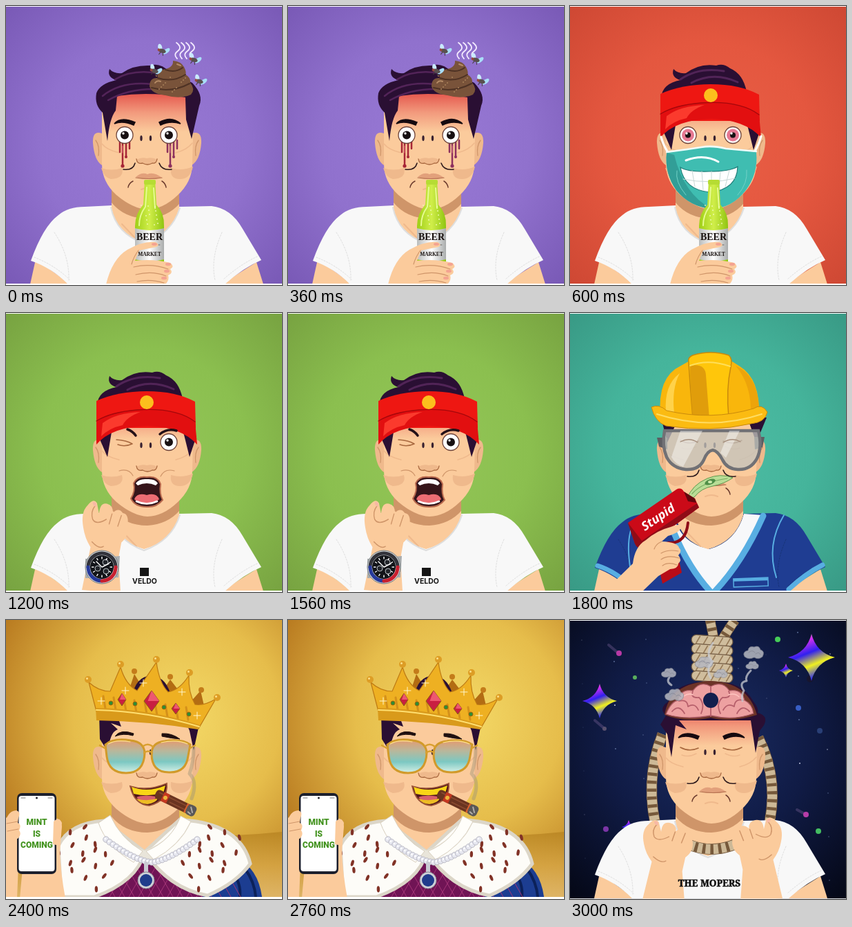
Animation, 400 px wide and 403 px high, one loop 3600 ms. Source, as an HTML page:

```html
<!DOCTYPE html>
<html lang="en">
<head>
<meta charset="utf-8">
<title>Portrait loop</title>
<style>
html,body{margin:0;width:100%;height:100%;overflow:hidden;background:#fff}
svg{position:absolute;left:0;top:0;width:400px;height:403px;display:block}
</style>
</head>
<body>
<svg id="stage" viewBox="0 0 400 403" xmlns="http://www.w3.org/2000/svg"></svg>
<script>
const SKIN = '#fbcb9c', SHADE = '#efb98c', DEEP = '#cf9569', LINE = '#a8683f', HAIR = '#2a0f33', GOLD = '#eeb022';

const p = (d, f, x = '') => `<path d="${d}" fill="${f}" ${x}/>`;
const l = (d, s, w = 1.5, x = '') =>
  `<path d="${d}" fill="none" stroke="${s}" stroke-width="${w}" stroke-linecap="round" stroke-linejoin="round" ${x}/>`;
const e = (x, y, rx, ry, f, m = '') => `<ellipse cx="${x}" cy="${y}" rx="${rx}" ry="${ry}" fill="${f}" ${m}/>`;
const c = (x, y, r, f, m) => e(x, y, r, r, f, m);
const r = (x, y, w, h, f, m = '') => `<rect x="${x}" y="${y}" width="${w}" height="${h}" fill="${f}" ${m}/>`;
const t = (x, y, s, size, f, font, m = '') =>
  `<text x="${x}" y="${y}" font-size="${size}" fill="${f}" font-family="${font}" text-anchor="middle" ${m}>${s}</text>`;
const g = (tr, s) => `<g transform="${tr}">${s}</g>`;
const many = (n, fn) => Array.from({ length: n }, (_, i) => fn(i)).join('');
const spots = (list, fn) => list.map(a => fn(...a)).join('');
const edge = (s, w = 1) => `stroke="${s}" stroke-width="${w}"`;

const stops = cs => cs.map((k, i) => `<stop offset="${i / (cs.length - 1)}" stop-color="${k}"/>`).join('');
const lin = (id, cs, x2 = 0, y2 = 1) => `<linearGradient id="${id}" x2="${x2}" y2="${y2}">${stops(cs)}</linearGradient>`;
const rad = (id, cs, cx = .5, cy = .5) => `<radialGradient id="${id}" cx="${cx}" cy="${cy}" r=".75">${stops(cs)}</radialGradient>`;

const defs = '<defs>' +
  rad('violet', ['#9879d5', '#9071cd', '#7656b3']) +
  rad('red', ['#e95f46', '#e4573f', '#cb4632']) +
  rad('green', ['#93c658', '#8bbf4f', '#759f3f']) +
  rad('teal', ['#4dbda4', '#45b49b', '#379682']) +
  rad('gold', ['#f4da68', '#e6bd4b', '#b4741c'], .62, .36) +
  rad('navy', ['#1b2d64', '#101b45', '#050817'], .5, .42) +
  lin('flush', ['#e5574d', '#f29a7d', '#fbcb9c']) +
  lin('floor', ['#b5811f', '#d9a948', '#ecca80']) +
  lin('lens', ['#e39a70', '#b9b79b', '#7cc8c2', '#d5efe6']) +
  lin('prism', ['#3cf040', '#d830f0', '#3020f0', '#f0f020', '#3030f0'], .4, 1) +
  lin('glass', ['#9fce16', '#d0ee4a', '#8fc410'], 1, 0) +
  lin('paper', ['#b9bcbc', '#ffffff', '#a9acac'], 1, 0) +
  '</defs>';

// ---- person ----
const neck = () =>
  p('M153 255V292Q160 330 200 341Q240 330 251 292V255Z', SKIN) +
  p('M153 258V284Q172 307 205 307Q234 305 251 286V258Z', DEEP) +
  l('M168 315L189 337', SHADE, 2);

const body = (cloth, seam) =>
  p('M35 402L43 366 94 402ZM373 402L363 370 312 402Z', SKIN) +
  p('M36 368Q54 318 76 302Q90 290 114 290L154 288Q202 350 250 290L298 289Q326 292 343 322L370 367Q344 378 317 402H90Q66 378 36 368Z', cloth) +
  l('M70 327Q92 360 91 396M313 327Q296 365 303 396', seam, 1, 'stroke-dasharray="2 2"') +
  l('M41 363Q70 374 92 395M364 362Q340 373 316 394', seam, 1, 'stroke-dasharray="2 2"') +
  neck() + l('M152 291Q160 329 200 343Q240 329 252 292', seam, 2);
const tee = () => body('#f8f8f8', '#dedede');

const nose = () =>
  e(196, 191, 1.7, 4, '#382130') + e(209.5, 191, 1.7, 4, '#382130') +
  p('M189 222Q196 218 204 220Q213 218 219 222Q218 229 212 227Q205 232 198 227Q191 229 189 222Z', SHADE) +
  l('M189 221Q190 229 198 227Q205 231 212 227Q218 228 219 221', LINE, 1.3);

const head = () =>
  p('M139 184Q125 179 126 198Q128 223 139 230ZM269 184Q284 179 283 198Q281 223 269 230Z', SHADE) +
  l('M130 194Q136 202 134 216M279 194Q273 202 275 216', DEEP, 1.3) +
  p('M139 150V228Q139 254 160 273Q184 293 205 294Q228 293 248 274Q270 254 270 228L272 150Q264 124 204 122Q145 124 139 150Z', SKIN) +
  p('M138 234Q153 239 168 234Q172 249 152 250Q142 248 138 234ZM239 234Q255 239 271 232Q267 250 252 250Q237 250 239 234Z', SHADE) +
  l('M139 199Q146 208 164 212M270 198Q262 208 246 212', SHADE) + nose();

const flush = () => p('M155 126H262L266 182H150Z', 'url(#flush)');
const sideburns = () => p('M134 178L147 208 153 172ZM276 178L266 208 257 172Z', HAIR);
const creases = () => l('M170 236Q184 238 187 227M240 236Q226 238 222 227', '#2d1a1c', 1.6);
const frown = () =>
  p('M188 247Q197 239 205 243Q214 239 226 248Q206 253 188 247Z', '#e2a07b') +
  l('M188 248Q207 251 226 248', '#b4704f', 1.2) + l('M177 262Q178 256 184 253M232 262Q231 256 226 253', '#6b3a2c', 1.5) + l('M196 265Q205 261 214 265', SHADE, 2);
const brows = () => p('M157 170Q166 159 187 168L185 172Q169 165 157 170ZM222 168Q240 158 253 170Q238 165 224 172Z', '#15090f', edge('#15090f', 1.5));
const shut = () =>
  l('M160 184Q173 191 186 185M222 185Q236 191 249 184', LINE, 1.6) +
  l('M162 195Q172 199 183 193M225 193Q237 199 246 195', SHADE);
const eye = (x, iris, pupil) =>
  c(x, 186.5, 12, '#fff', edge('#6b4138', 1.3)) + c(x, 186.5, iris, '#e57892') + c(x, 186.5, pupil, '#171012') + c(x - 2, 184, 1.7, '#fff');

const topHair = () =>
  p('M132 132Q134 112 160 107Q146 103 150 91Q156 98 168 97Q188 82 212 86Q222 82 232 90Q251 98 256 124Z', HAIR) +
  l('M160 106Q186 88 223 94M176 111Q208 94 243 110', '#512457', 3);

const visor = () => topHair() + sideburns() +
  p('M131 127Q162 113 204 113Q246 113 274 128L275 166H131Z', '#ee1712') +
  p('M131 157Q150 142 190 140Q245 136 274 157L277 190Q253 164 205 163Q153 164 131 190Z', '#e20f10') +
  p('M140 159Q160 144 195 143Q175 150 169 162Q150 166 138 178Z', '#fb3a2d') +
  l('M131 156Q152 143 190 140Q246 136 274 157', '#a5070b', 1.3) +
  c(204, 129, 10, '#fcbf1d');

// Clenched hand with forearm
const fist = () =>
  p('M0 116L12 61Q4 49 2 36Q-2 16 8 7Q16-3 21 4L24 18Q25 3 35 5Q44 7 43 17Q51 9 57 17Q65 18 64 30Q67 45 55 55L51 75 54 120Z', SKIN) +
  l('M18 8Q12 15 15 25Q20 33 34 25M42 18L38 31M55 20L50 34M14 54Q24 64 30 60', DEEP, 1.3) +
  p('M15 3Q21 1 20 9Q15 8 15 3Z', '#f7b8a5');

// ---- props ----
const bottle = () =>
  p('M201 252H216L218 287Q230 300 229 318V394Q208 401 187 394V318Q187 300 199 287Z', 'url(#glass)') +
  r(200, 251, 17, 7, '#b6dc33', 'rx="2"') +
  l('M204 262L202 290Q193 302 193 317M214 263L216 292', '#e7fb93', 2) +
  many(13, i => c(196 + i * 37 % 25, 288 + i * 13 % 32, .9, '#effbb4')) +
  p('M187 321Q208 327 229 321V366Q208 371 187 366Z', 'url(#paper)') +
  t(208, 338, 'BEER', 14, '#17100e', 'Liberation Serif, serif', 'font-weight="700"') +
  l('M193 345H202M213 345H223', '#6a6767', 1) +
  t(208, 361, 'MARKET', 7.5, '#17100e', 'Liberation Serif, serif', 'font-weight="700"');

const grip = () =>
  p('M145 402Q154 365 176 352Q199 339 217 341Q224 345 218 348L193 353 187 368Q214 365 238 371Q245 376 238 380Q243 386 235 389Q237 395 232 401V403H145Z', SKIN) +
  l('M192 353Q185 362 182 373M185 377Q210 371 235 380M188 388Q212 382 232 390M190 398Q210 394 229 400', DEEP, 1.2) +
  spots([[235, 373], [233, 383], [229, 393]], (x, y) => e(x, y, 4, 2.2, '#f4a391')) + e(215, 344, 4, 2, '#f4a391');

const fly = (x, y) => g(`translate(${x} ${y}) rotate(18)`,
  e(-3, -4, 3, 5, '#c9eaff', 'transform="rotate(-30)"') + e(5, -3, 3, 6, '#a9def8', 'transform="rotate(35)"') +
  e(0, 2, 5.5, 3, '#59504f') + c(-5, 2, 2, '#96483d') + l('M-2 5L-3 8M2 5L3 8', '#443c3b', 1));

const pile = () =>
  many(4, i => l(`M${248 + i * 7} 76Q${242 + i * 7} 70 ${249 + i * 7} 65T${247 + i * 7} 53`, '#f3eaff', 1.8)) +
  p('M208 116Q208 103 220 104Q217 93 231 91Q243 88 242 79Q254 80 258 88Q262 96 260 99Q268 103 267 111Q275 120 268 128Q252 135 231 129Q211 127 208 116Z', '#79533a') +
  l('M220 104Q242 111 260 99M211 118Q240 126 266 112M231 92Q246 97 256 89', '#4e3224', 2) +
  many(12, i => c(218 + i * 29 % 45, 101 + i * 17 % 24, 1, '#a9805a')) + l('M216 111Q219 107 224 109M248 84L253 86', '#b58b66', 2) +
  fly(227, 63) + fly(216, 92) + fly(273, 76) + fly(281, 107);

const blood = (x, k) =>
  l(`M${x - 7} 195V211M${x - 3} 196V229M${x + 2} 196V217M${x + 7} 194V206`, k, 2.5) +
  c(x - 3, 231, 2.6, k) + c(x + 2, 218, 2, k) + l(`M${x - 3} 202V212`, '#ef8591', .8);

const mask = () =>
  l('M132 189Q137 207 147 218M277 188Q272 207 262 217', '#fff', 3) +
  p('M140 212Q172 207 190 204Q206 201 226 206L270 211Q273 242 255 266Q235 292 205 293Q174 290 154 266Q137 242 140 212Z', '#3fbdb1') +
  p('M140 212Q137 242 154 266Q174 290 205 293Q165 272 151 215Z', '#329e97') +
  l('M140 211Q172 207 190 204Q206 201 226 206L270 210', '#effcfa', 2.5) +
  l('M168 223Q194 213 215 225', '#fff', 3) + l('M155 238Q152 254 168 273M256 237Q258 256 243 273', '#73d2c7', 1) +
  p('M160 233Q171 240 202 239Q232 239 243 232Q242 265 203 269Q166 266 160 233Z', '#fff', edge('#207e79', 1.2)) +
  l('M164 250Q202 258 239 249M177 238L181 261M191 239L193 266M205 239V267M218 239L216 265M231 237L225 261', '#c9d8d6', 1);

const watch = () =>
  p('M115 355L165 351 163 382 115 383Z', '#a9adaf') +
  l('M117 361H162M117 368H162M117 375H162M122 354V382M157 353V381', '#e9eded', 1.3) +
  c(139, 367, 24, '#d5d8d9', edge('#73797c')) +
  l('M119 367A20 20 0 0 1 159 367', '#32333b', 5) + l('M119 367A20 20 0 0 0 139 387', '#263a9c', 5) + l('M139 387A20 20 0 0 0 159 367', '#c8202f', 5) +
  c(139, 367, 17, '#121419') + spots([[133, 369], [144, 360], [145, 373]], (x, y) => c(x, y, 4, '#22252b', edge('#b8bec2'))) +
  many(12, i => r(138.3, 352, 1.4, 3.5, '#fff', `transform="rotate(${i * 30} 139 367)"`)) + l('M139 367L131 359M139 367L149 362', '#fff', 1.4);

const gasp = () =>
  p('M185 246Q190 235 204 237Q220 235 224 247Q222 261 227 270Q218 281 204 280Q187 280 181 268Q188 257 185 246Z', '#36151a', edge('#b9694d', 2)) +
  p('M188 246Q193 239 204 240Q216 239 220 246L217 249Q204 243 191 249Z', '#fff') +
  p('M186 269Q190 259 204 263Q218 259 222 269Q214 276 204 276Q193 276 186 269Z', '#ec6d73') +
  l('M189 272Q204 279 219 272', '#fff', 2.6) + l('M164 228Q178 224 184 235M244 228Q230 224 224 236', DEEP, 1.2);

const scrubs = () =>
  body('#1f3d92', '#183477') +
  p('M149 291Q160 333 202 341Q241 330 252 290L281 292Q250 360 210 402H200Q172 370 149 316Z', '#f7f8fa') + neck() +
  l('M151 318Q172 368 203 402M280 293Q250 360 210 402', '#58aee2', 9) +
  l('M40 365Q68 374 91 398M366 364Q342 376 317 399', '#58aee2', 7) +
  l('M104 292Q76 309 89 378M310 292Q284 335 299 382', '#58aee2', 2) +
  r(237, 383, 50, 12, '#1f3d92', 'transform="rotate(-2 262 388)" ' + edge('#58aee2', 1.5)) +
  r(237, 383, 50, 4, '#58aee2', 'transform="rotate(-2 262 388)"');

const helmet = () =>
  p('M131 150Q126 92 161 76Q205 48 246 77Q276 95 274 150Z', '#f9b60c') +
  p('M139 143Q136 104 159 87Q147 109 151 145Z', '#ffd24a') +
  p('M240 76Q276 92 274 150H262Q264 104 240 76Z', '#eda40a') +
  p('M178 152Q174 105 172 72Q170 64 178 61Q204 53 230 61Q236 66 233 78Q226 110 230 151Z', '#ffc60b', edge('#c98a0c', 1.5)) +
  p('M178 151Q174 105 174 76Q196 72 197 90L202 153Z', '#e09d0b') +
  l('M174 76Q200 66 232 77', '#ffdf59', 2) +
  p('M118 136Q129 131 140 141Q205 156 266 138Q278 130 286 143Q283 158 262 160Q205 173 139 163Q123 157 118 136Z', '#fbbb12', edge('#c98a0c', 1)) +
  l('M126 146Q203 171 278 146', '#ffdc62', 2);

const goggles = () =>
  p('M126 180H141V197L129 193ZM267 179H282L279 194 268 197Z', '#5d5d62') +
  p('M137 170H273Q279 194 271 210Q262 227 243 226Q227 225 221 212Q214 199 207 198Q199 199 194 212Q187 227 168 226Q148 224 140 208Q133 192 137 170Z', '#c3c4be', 'fill-opacity=".76" stroke="#717175" stroke-width="4.5"') +
  p('M160 170H192L164 222Q152 218 147 208ZM231 170H246L226 209 218 202Z', '#fff', 'opacity=".42"') +
  l('M160 186Q173 179 185 187M222 187Q235 179 247 186', '#a58e7c', 1.3);

const bill = () =>
  p('M169 269Q177 248 199 239Q218 231 236 238Q223 247 207 250Q190 253 180 266Z', '#b9dd96', edge('#5e984d', 1)) +
  l('M177 261Q192 244 228 239', '#78ad62', 1.2) + e(203, 244, 8, 3.8, '#4f8e47', 'transform="rotate(-20 203 244)"') + e(203, 244, 3, 2, '#c8e8a9');

const gun = () =>
  p('M124 345L153 335 162 375 134 391Z', '#b80c17') + l('M142 332Q168 334 171 303', '#8f0c17', 4) +
  p('M84 303L154 255Q161 251 165 258L181 268 187 281 110 337Q99 344 94 333Z', '#cb0a18') +
  p('M84 303L94 333Q99 344 110 337L187 281 184 275 104 329Z', '#8f0c17') + p('M165 258L181 268 183 274 171 272Z', '#63070e') +
  t(0, 0, 'Stupid', 18, '#fff', 'Open Sans, sans-serif', 'font-weight="700" font-style="italic" transform="translate(131 300) rotate(-34)"') +
  p('M50 402L91 362Q94 337 110 328Q126 314 146 309Q160 303 161 309Q160 317 142 322L133 330Q156 331 158 339Q163 344 157 350Q163 357 157 362Q157 369 145 370L128 380 105 402Z', SKIN) +
  l('M133 330Q124 334 122 341M157 344Q142 341 132 347M158 354Q142 349 132 356M155 364Q142 359 134 365', DEEP, 1.2);

const crown = () =>
  p('M176 108L186 78 203 106ZM226 104L238 86 255 108ZM266 120L282 102 288 128Z', '#b36c13') +
  spots([[186, 74], [238, 82], [283, 101]], (x, y) => c(x, y, 4, '#c47c1a')) +
  p('M183 110Q188 82 210 80Q234 82 240 114Z', HAIR) +
  p('M131 132L120 90Q134 103 151 103L166 68Q173 93 190 102L218 61Q222 91 235 104Q252 101 265 80Q264 105 274 122Q288 124 304 114L279 157Q205 134 131 132Z', GOLD, edge('#bd7913', 1.2)) +
  many(9, i => l(`M${141 + i * 15} ${110 + i * 2}L${144 + i * 15} ${128 + i * 2}`, '#d4901a', 3)) +
  p('M130 127Q207 128 282 152L278 158Q205 146 131 145Z', '#d99a1b') + l('M131 130Q207 132 280 154', '#ffdf70', 2) +
  spots([[119, 86], [166, 64], [218, 57], [266, 76], [306, 112]], (x, y) => c(x, y, 5, '#dd9d25') + c(x - 1.5, y - 1.5, 1.5, '#ffe08a')) +
  spots([[168, 115, 6, 9], [211, 117, 11, 15], [246, 128, 6, 8]], (x, y, w, h) =>
    p(`M${x} ${y - h}L${x + w} ${y} ${x} ${y + h} ${x - w} ${y}Z`, '#c91f42', edge('#8a5c12')) + p(`M${x} ${y - h}L${x + w} ${y} ${x - w / 2} ${y}Z`, '#ed5870')) +
  spots([[152, 120], [187, 121], [229, 126], [265, 136]], (x, y) => c(x, y, 3, '#2f8d35', edge('#9c6510'))) +
  spots([[138, 117], [173, 102], [199, 91], [255, 104], [277, 138]], (x, y) => l(`M${x - 5} ${y}H${x + 5}M${x} ${y - 5}V${y + 5}`, '#fff6ca', 1));

const shades = () =>
  p('M144 180Q155 170 181 174Q200 176 201 192Q200 221 174 221Q149 221 146 197Z', 'url(#lens)', edge('#d19a2a', 3)) +
  p('M267 180Q254 171 230 175Q211 177 211 193Q211 220 236 220Q261 221 264 196Z', 'url(#lens)', edge('#d19a2a', 3)) +
  l('M199 182Q206 177 213 183M200 192Q206 187 212 192M143 185L136 181M267 185L274 181', '#d9a030', 2.5) + l('M148 179Q160 172 180 176M225 177Q247 172 263 179', '#ffe28a', 1.2);

const cigar = () =>
  l('M269 258Q278 234 266 222Q272 205 272 185', '#9d9278', 5, 'opacity=".45"') +
  p('M180 240Q205 248 233 236Q235 261 208 268Q186 267 180 240Z', '#4f171a', edge('#9c5238', 1.8)) +
  p('M182 241Q205 250 231 239L228 250Q205 256 185 251Z', '#f9d516') + p('M189 256Q198 252 218 255L214 261H194Z', '#d9606a') +
  p('M189 258Q205 263 221 257Q216 265 205 266Q194 265 189 258Z', '#eebc24') +
  g('translate(217 250) rotate(26)', r(0, -7, 60, 14, '#6a3420', 'rx="5"') + l('M5-3H48M24 3H48', '#8a4b30', 1.5) +
    r(11, -7, 9, 14, '#c53820') + c(15.5, 0, 3, '#eeb43b') + r(48, -7, 3, 14, '#d9602c') + r(50, -8, 14, 16, '#5a5858', 'rx="5"') + l('M55-4L60 2M54 4L58 5', '#b0aca8', 2));

const robe = () =>
  p('M33 400Q34 378 45 362L84 345H335Q365 358 371 400Z', '#1c3d91') + l('M328 364Q341 380 339 400M347 360Q360 378 362 400', '#0c2159', 4) +
  r(120, 328, 165, 73, '#701455') +
  many(14, i => l(`M${108 + i * 14} 400L${148 + i * 14} 330M${118 + i * 14} 330L${158 + i * 14} 400`, '#a43577', 1)) +
  neck() +
  p('M80 400L76 326Q92 293 142 290L201 335Q190 378 128 400ZM354 352Q334 380 292 398Q236 388 201 335L252 288 276 291Q342 302 354 352Z', '#fdfcf8', edge('#dcd6c8', 5)) +
  p('M142 292Q150 330 201 352Q252 330 268 292L253 284Q241 318 201 333Q164 318 151 284Z', '#e9e5da') +
  p('M134 293L151 282Q166 316 198 334L185 350Q146 328 134 293ZM268 291L253 283Q241 318 203 334L214 346Q252 326 268 291Z', '#fffefa', edge('#d8cfbe')) +
  many(36, i => {
    const side = i % 2 ? 1 : -1, k = i >> 1, a = .36 + (k % 6) * .125 + (k % 3) * .03, d = 93 + (k / 6 | 0) * 22 + k % 2 * 5;
    const x = 205 + side * d * Math.cos(a) * 1.04, y = 266 + d * Math.sin(a);
    return e(x, y, 2.2, 4.6, '#813226', `transform="rotate(${side * (k * 23 % 50 - 40)} ${x} ${y})"`);
  });

const pearls = () =>
  many(27, i => {
    const u = i / 13 - 1;
    return c(211 + u * 66, 350 - 33 * Math.abs(u) ** 1.5, 4.3, '#e6e7f0', edge('#a9a8b4', .7)) + c(210 + u * 66, 349 - 33 * Math.abs(u) ** 1.5, 1.3, '#fff');
  }) + l('M203 352V366', '#c9cad2', 6) + c(203, 376, 12, '#d1d2d8', edge('#858894')) + c(203, 376, 9, '#203c8c');

const phone = () =>
  p('M0 286L14 276 25 310 18 355 16 402H0ZM60 286Q78 282 81 298L78 335Q79 364 86 402H20L24 358Z', SKIN) +
  r(16, 250, 57, 117, '#1c1f2c', 'rx="7"') + r(18.5, 254, 52, 109, '#fff', 'rx="4"') +
  l('M22 257H28M61 257H67', '#777', 1) + c(44.5, 257, 1.5, '#22232a') +
  p('M0 290Q3 276 15 275Q22 277 18 286L17 293Q23 295 19 304Q23 308 18 315L0 326Z', SKIN) + l('M1 294L17 291M2 305L18 302', DEEP, 1) +
  p('M69 291Q77 283 81 293L78 326 68 324Z', SKIN) +
  ['MINT', 'IS', 'COMING'].map((s, i) => t(44.5, 296 + i * 16.5, s, 12, '#43931f', 'Roboto, sans-serif', 'font-weight="900"')).join('');

// Striped cord along a path
const rope = (d, w = 14) => {
  const flat = 'style="stroke-linecap:butt"';
  return l(d, '#705439', w + 1.5, flat) + l(d, '#cdb997', w, flat) + l(d, '#76593b', w, flat + ' stroke-dasharray="4.5 7"');
};

const knot = () =>
  rope('M203 0L209 30M239 0Q230 13 219 31', 13) +
  many(5, i => g(`rotate(4 206 ${30 + i * 13})`, r(176, 23 + i * 13, 60, 14, '#cfbd9d', 'rx="7" ' + edge('#715a42', 1.2)) +
    many(5, j => l(`M${183 + j * 11} ${35 + i * 13}l5-10`, '#967a58', 1.7))));

const puff = (x, y, s = 1) => g(`translate(${x} ${y}) scale(${s})`,
  p('M-13 5Q-17-2-8-4Q-7-11 1-9Q8-12 10-5Q17-3 13 5Q7 10 1 6Q-7 10-13 5Z', '#b6b8c1', 'opacity=".86" ' + edge('#7f828e', .8)) + l('M-7-1Q-2-6 2-1M3 1Q8-3 10 2', '#888b98', 1));

const smoke = () =>
  puff(143, 77, .75) + puff(151, 109, .95) + puff(266, 48) + puff(264, 66, .65) + puff(194, 62, .9) + puff(218, 78, .7) +
  l('M144 83Q139 89 147 94M262 73Q253 82 256 88Q244 90 252 102Q248 109 250 117M207 33Q195 51 207 60Q196 70 204 84', '#c9cbd2', 3, 'opacity=".75"');

const brain = () =>
  p('M147 198L141 165 131 151 139 138Q128 128 142 118Q153 88 204 89Q250 87 266 118Q274 128 272 134Q288 138 281 152L275 160 269 192 262 145H158L169 158 153 152Z', HAIR) +
  p('M137 137Q144 91 204 88Q258 90 271 137Q233 149 204 141Q166 149 137 137Z', '#6c3327') +
  p('M139 136Q147 117 157 116Q160 99 178 102Q189 87 204 96Q221 87 231 102Q249 99 253 116Q264 121 266 135Q237 146 204 138Q167 145 139 136Z', '#eda1a1', edge('#a85862', 1.3)) +
  l('M204 96V139M158 117Q170 114 171 125Q181 119 186 130M178 103Q174 113 187 112Q196 121 190 135M148 132Q158 121 166 135M251 116Q239 113 238 125Q228 119 222 130M230 103Q235 113 221 112Q211 121 218 135M260 132Q249 121 242 135', '#b65f6b', 1.8) +
  l('M165 110Q172 105 178 108M230 108Q239 105 245 111', '#ffc5c0', 1.5) + c(204, 116, 11, '#121e4d');

const star = (x, y, s) => g(`translate(${x} ${y}) scale(${s})`,
  p('M0-1Q.2-.2 1 0Q.2 .2 0 1Q-.2 .2-1 0Q-.2-.2 0-1Z', 'url(#prism)'));

const sky = () =>
  many(48, i => c((i * 89 + 17) % 400, (i * 137 + 29) % 390, .4 + i % 3 * .25, i % 4 ? '#60739e' : '#d1d5ec')) +
  l('M56 36L69 47M329 274L340 280M36 145L49 156', '#735e92', 4, 'opacity=".4"') +
  spots([[71, 48, 4, '#b839a6'], [301, 28, 4, '#46cd58'], [94, 83, 3, '#5aaf5d'], [331, 127, 4, '#385ec4'], [52, 302, 4, '#7b35a6'], [50, 157, 3, '#59516e'], [362, 160, 4, '#293f76'], [342, 281, 4, '#b63da7'], [360, 305, 4, '#44bd62'], [348, 85, 5, '#17152e']], c) +
  star(43, 117, 25) + star(350, 54, 34) + star(313, 73, 10) + star(85, 299, 10);

// ---- scenes: fill, top, bottom, content ----
const scenes = [
  ['violet', 1, 401, () => tee() + head() + flush() +
    p('M147 195L140 154Q128 143 131 126Q136 112 160 107Q146 103 150 91Q156 98 168 97Q184 85 209 86Q223 81 237 95L270 111Q287 129 280 144L269 192 261 164L260 132Q207 123 161 130L159 151Q150 162 147 195Z', HAIR) +
    l('M158 106Q185 90 225 98M140 130Q167 108 212 113M148 136Q178 119 218 120', '#532459', 2.5) +
    brows() + blood(172, '#a62535') + blood(241, '#8d315e') + eye(172, 0, 6) + eye(236, 0, 6) + creases() + frown() + bottle() + pile() + grip()],
  ['red', 1, 401, () => tee() + head() + flush() + visor() + eye(171, 9, 4) + eye(236, 9, 4) + mask() + bottle() + grip()],
  ['green', 1, 401, () => tee() + head() + flush() + visor() +
    l('M176 168Q184 171 188 177M223 175Q234 166 247 170', '#241118', 3.5) + l('M160 183Q175 184 183 189Q172 194 162 190', LINE) + eye(236, 0, 6) + gasp() +
    g('translate(110 270) scale(1.04 1.12)', fist()) + watch() + r(194, 368, 13, 12, '#151515') +
    t(201, 391, 'VELDO', 10.5, '#151515', 'Inter, sans-serif', 'font-weight="700"')],
  ['teal', 1, 401, () => scrubs() + head() + p('M132 151H158L141 187ZM257 151H285L270 187Z', HAIR) + shut() + creases() + frown() + goggles() + helmet() + bill() + gun()],
  ['gold', 0, 400, () => p('M0 306Q60 312 120 312H280Q340 312 400 306V402H0Z', 'url(#floor)', 'opacity=".75"') + robe() + head() +
    p('M135 135H160L167 154 152 149 162 158Q150 162 148 191L136 172ZM260 146H281L272 188 266 160Z', HAIR) +
    p('M158 168Q166 157 185 164L184 167Q170 163 158 168ZM226 164Q240 163 252 172Q240 171 226 168Z', '#20100f', edge('#20100f')) + shut() + shades() + cigar() + crown() + pearls() + phone()],
  ['navy', 1, 402.4, () => sky() + rope('M134 165Q106 235 128 312M273 170Q306 235 285 310') + knot() + tee() + head() + flush() +
    brain() + smoke() + brows() + shut() + creases() + frown() + rope('M150 312Q204 350 262 312') +
    g('translate(105 288) scale(1.13 1)', fist()) + g('translate(308 284) scale(-1.13 1.02)', fist()) +
    t(202, 385, 'THE MOPERS', 13.5, '#111', 'Noto Serif, serif', 'font-weight="900" ' + edge('#111', .5))]
];

const stage = document.getElementById('stage');
stage.innerHTML = defs + scenes.map(([fill, top, end, draw]) =>
  `<g class="scene">${r(0, 0, 400, 403, '#fff')}${r(0, top, 400, end - top, `url(#${fill})`)}${draw()}${r(0, end, 400, 4, '#fff')}${r(0, 0, 400, top, '#fff')}</g>`).join('');

const HOLD = 600, LOOP = HOLD * scenes.length;
stage.querySelectorAll('.scene').forEach((el, i) => el.animate([
  { opacity: 1, offset: 0, easing: 'steps(1, end)' },
  { opacity: 0, offset: HOLD / LOOP, easing: 'steps(1, end)' },
  { opacity: 0, offset: 1 }
], { duration: LOOP, delay: i * HOLD - LOOP, iterations: Infinity }));
</script>
</body>
</html>
```
